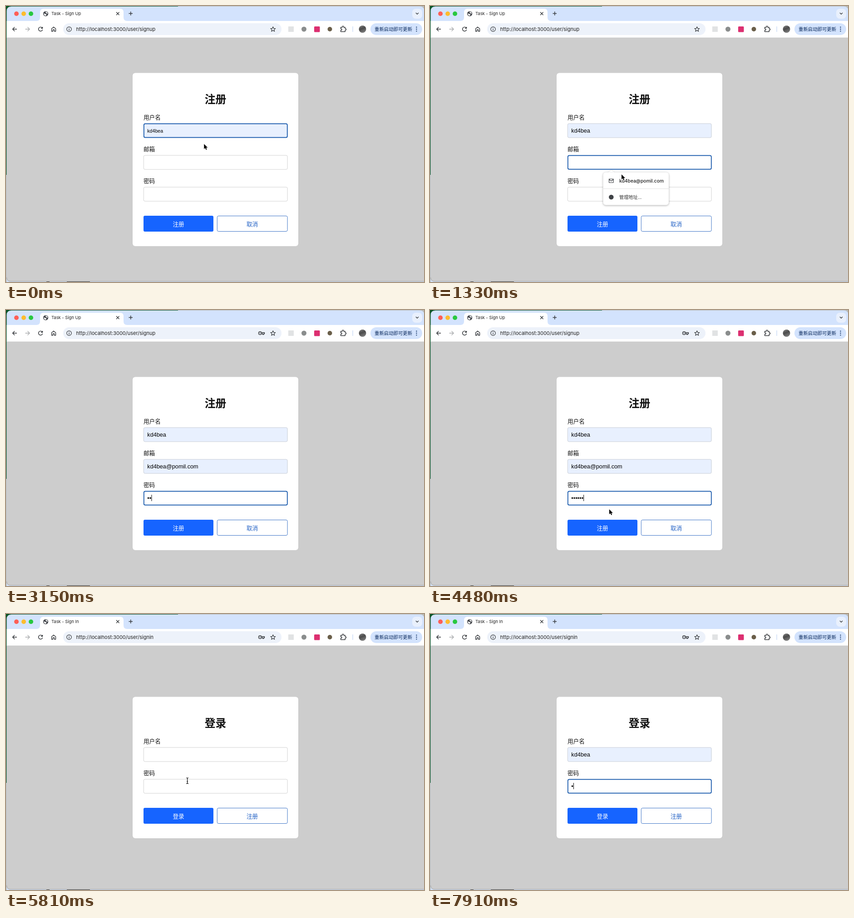
Recreate the animation shown at these times as an HTML page. Size 921 by 608 pixels, loop 8000 ms.

```html
<!DOCTYPE html>
<html lang="zh-CN">
<head>
<meta charset="utf-8">
<title>Sign up</title>
<style>
html, body { margin: 0; width: 100%; height: 100%; overflow: hidden; }
svg { display: block; width: 921px; height: 608px; }
text { font-family: Inter, "Noto Sans CJK SC", "Noto Sans CJK", sans-serif; fill: #1f1f1f; white-space: pre; }
.cjk { font-family: "Noto Sans CJK SC", "Noto Sans CJK", sans-serif; font-size: 12.6px; fill: #111; }
.value { font-family: "Liberation Sans", Arial, sans-serif; font-size: 12.7px; fill: #000; }
.mid { text-anchor: middle; }
.icon { fill: none; stroke: #34373b; stroke-width: 1.4; stroke-linejoin: round; }
.popup { filter: drop-shadow(0 1px 2px #0005); }
</style>
</head>
<body>
<svg viewBox="0 0 921 608">
  <defs>
    <linearGradient id="photo" x2="0.4" y2="1">
      <stop stop-color="#8b8b8b"/><stop offset=".5" stop-color="#4b4b4b"/><stop offset="1" stop-color="#777"/>
    </linearGradient>
    <g id="globe">
      <circle r="5.6" fill="#45484d"/>
      <path d="M-4 -1.6Q-2.6 1 -.4 .4T1 3.6L-.6 4.6Q-4.6 3.4 -4 -1.6ZM.2 -4.4Q3.8 -3.8 4.4 -.4Q2.2 .6 1.6 -1.2T-.6 -2Z" fill="#fff"/>
    </g>
  </defs>

  <!-- desktop edge and window -->
  <rect width="921" height="608" fill="#b9bbb9"/>
  <path d="M0 0H379V12H12V372H0Z" fill="#0b5426"/>
  <path d="M1.5 608V11Q1.5 1 12 1H911Q921 1 921 9V608Z" fill="#d3e3fd"/>
  <rect x="1.5" y="33" width="920" height="37" fill="#fff"/>
  <path d="M1.5 69.5H921V607H9Q1.5 606 1.5 599Z" fill="#cdcdcd"/>
  <path d="M1.5 598Q2 606.5 10 606.5H921" fill="none" stroke="#a5a5a5"/>
  <path d="M89 607.5H96M134 607.5H185" stroke="#555"/>

  <!-- tab strip -->
  <circle cx="23" cy="17" r="5" fill="#ff5f57"/>
  <circle cx="39" cy="17" r="5" fill="#febc2e"/>
  <circle cx="55" cy="17" r="5" fill="#28c840"/>
  <path d="M67 33Q75 33 75 25V14Q75 6 83 6H251Q259 6 259 14V25Q259 33 267 33Z" fill="#fff"/>
  <path class="icon" d="M243 13.5L249.500 20M249.500 13.500L243 20M270.500 16.500H279M274.750 12.250V20.750"/>
  <rect x="895" y="6" width="22" height="22" rx="8" fill="#e9f0fd"/>
  <path class="icon" d="M903 15L906 18L909 15"/>

  <!-- toolbar -->
  <path class="icon" d="M24 51H15M19 46.500L14.600 51L19 55.500"/>
  <path class="icon" style="stroke:#a9abad" d="M42.500 51H51.500M47.500 46.500L52 51L47.500 55.500"/>
  <path class="icon" d="M100.500 50L105 46.300L109.500 50V55.700H106.500V52.200H103.500V55.700H100.500Z"/>
  <rect x="126" y="38" width="481" height="26" rx="13" fill="#edf2fa"/>
  <circle class="icon" cx="139" cy="51" r="5.200" style="stroke-width:1.200"/>
  <path class="icon" d="M139 50.400V53.800M139 48V49.200"/>
  <path class="icon" style="stroke-width:1.200" d="M588.300 45.700L589.800 49.300L593.700 49.600L590.700 52.100L591.700 55.900L588.300 53.800L584.900 55.900L585.900 52.100L582.900 49.600L586.800 49.300Z"/>
  <rect x="622" y="45" width="12" height="12" fill="#e1e3e4"/>
  <circle cx="656.500" cy="51" r="5.500" fill="#8a8d8d"/>
  <rect x="679" y="45" width="12.500" height="12.500" rx="1.500" fill="#dc2f70"/>
  <circle cx="713.500" cy="51" r="5" fill="#6a5e49"/>
  <path class="icon" d="M737.500 47H741V45.600A1.500 1.500 0 0 1 744 45.600V47H747.300V50H748A1.500 1.500 0 0 1 748 53.200H747.300V56.500H737.500V53.500Q740 53.500 740 51.700T737.500 50Z"/>
  <path d="M764 45V57" stroke="#c5d7f5" stroke-width="1.300"/>
  <circle cx="785.500" cy="51" r="8" fill="url(#photo)"/>
  <rect x="803" y="38" width="114" height="26" rx="13" fill="#d3e3fd"/>
  <text class="cjk" x="812" y="54.800" style="font-size:10.400px;font-weight:500;fill:#08285c">重新启动即可更新</text>
  <path d="M904.500 46.700V46.710M904.500 51V51.010M904.500 55.300V55.310" stroke="#08285c" stroke-width="2.300" stroke-linecap="round"/>

  <g id="live"></g>
</svg>

<script>
const DURATION = 8000, STEP = 70;
const USER = 'kd4bea', EMAIL = 'kd4bea@pomil.com';
const FOCUS_EMAIL = 700, FILL_EMAIL = 1610, FOCUS_PASSWORD = 2240, SUBMIT = 4830;
const SIGN_IN = 5110, FOCUS_USER = 6090, FILL_USER = 6440, FOCUS_AGAIN = 7280;
const keyTimes = [2870, 3150, 3360, 3570, 3850, 4060], lastKey = 7770;
const caretResets = [70, FOCUS_EMAIL, FILL_EMAIL, FOCUS_PASSWORD, ...keyTimes,
  FOCUS_USER, FILL_USER, FOCUS_AGAIN, lastKey];

// Pointer stops: time, x, y
const pointerPath = [
  [210, 436.3, 304], [770, 415, 343], [840, 415, 343], [1190, 422, 371], [1540, 422, 371],
  [2170, 405, 411], [4270, 405, 411], [4760, 379.3, 482.3], [5460, 379.3, 482.3],
  [6020, 409, 314], [6090, 409, 314], [6300, 376, 349], [6580, 374, 347], [6650, 387, 362.500],
  [6860, 387, 362.500], [7070, 379, 380],
];

const live = document.getElementById('live');
const ruler = document.createElement('canvas').getContext('2d');
ruler.font = '12.7px "Liberation Sans", Arial, sans-serif';

const within = (t, from, to) => t >= from && t < to;
const text = (x, y, content, attrs = '') => `<text x="${x}" y="${y}" ${attrs}>${content}</text>`;
const box = (x, y, w, h, attrs) => `<rect x="${x}" y="${y}" width="${w}" height="${h}" ${attrs}/>`;
const icon = (d, attrs = '') => `<path class="icon" d="${d}" ${attrs}/>`;

function pointerAt(t) {
  const i = pointerPath.findIndex(stop => stop[0] > t);
  if (i === 0) return pointerPath[0].slice(1);
  if (i < 0) return pointerPath.at(-1).slice(1);
  const [t0, x0, y0] = pointerPath[i - 1], [t1, x1, y1] = pointerPath[i];
  const u = (t - t0) / (t1 - t0), k = u * u * (3 - 2 * u);
  return [x0 + (x1 - x0) * k, y0 + (y1 - y0) * k];
}

function formAt(t) {
  if (t < SIGN_IN) return {
    title: '注册', buttons: ['注册', '取消'],
    fields: [
      { label: '用户名', value: USER, auto: true, preview: t < 70, focus: t < FOCUS_EMAIL },
      { label: '邮箱', value: t < 1400 ? '' : EMAIL, auto: t >= 1400, preview: t < FILL_EMAIL,
        focus: within(t, FOCUS_EMAIL, FOCUS_PASSWORD) },
      { label: '密码', value: '•'.repeat(keyTimes.filter(k => k <= t).length),
        focus: within(t, FOCUS_PASSWORD, SUBMIT) },
    ],
  };
  return {
    title: '登录', buttons: ['登录', '注册'],
    fields: [
      { label: '用户名', value: t < 6370 ? '' : USER, auto: t >= 6370, preview: t < FILL_USER,
        focus: within(t, FOCUS_USER, 7210) },
      { label: '密码', value: t < lastKey ? '' : '•', focus: t >= 7210 },
    ],
  };
}

function drawField(field, y, t) {
  const { value, focus, auto, preview } = field;
  const fill = auto ? '#e8f0fe' : '#fff';
  let out = text(303, y - 8.8, field.label, 'class="cjk"');
  out += focus
    ? box(303.8, y + .8, 316, 30.4, `rx="3" fill="${fill}" stroke="#0e52a8" stroke-width="1.700"`)
    : box(303.3, y + .5, 316.8, 31, `rx="3" fill="${fill}" stroke="${auto ? '#c8cdd6' : '#d2d2d2'}"`);
  out += text(311.3, y + (preview ? 20 : 20.3), value,
    `class="value" ${preview ? 'style="font-size:10.600px"' : ''}`);
  const reset = caretResets.filter(r => r <= t).at(-1);
  if (focus && !(value && preview) && t !== 7210 && (t - reset) % 980 < 490)
    out += box(311.5 + ruler.measureText(value).width, y + 8.5, 1, 14, 'fill="#000"');
  return out;
}

function drawForm({ title, buttons, fields }, t) {
  const h = 171.5 + 70 * fields.length, top = 338.25 - h / 2, y = top + 104.5 + 70 * fields.length;
  return box(279, top, 365, h, 'rx="6" fill="#fff"')
    + text(461.5, top + 66, title, 'class="cjk mid" style="font-size:23.800px;font-weight:700"')
    + fields.map((field, i) => drawField(field, top + 111 + 70 * i, t)).join('')
    + box(303, y, 154, 35, 'rx="3" fill="#1664ff"')
    + box(465.3, y + .5, 154.800, 34, 'rx="3" fill="#fff" stroke="#3e74c6"')
    + text(380, y + 22.7, buttons[0], 'class="cjk mid" style="fill:#fff"')
    + text(542.5, y + 22.7, buttons[1], 'class="cjk mid" style="fill:#1f5fc4"');
}

function drawPopup(x, y, w, h, content) {
  return `<g class="popup">${box(x, y, w, h, 'rx="6" fill="#fff"')}
    <path d="M${x + 11} ${y}l7 -4.500l7 4.500z" fill="#fff"/></g>${content}`;
}

function drawPopups(t) {
  const style = 'style="font-size:10.250px;font-weight:500"';
  if (within(t, 770, FILL_EMAIL)) return drawPopup(381.5, 366.5, 144.5, 72,
    box(381.5, 402, 144.5, 1, 'fill="#e2e2e2"')
    + icon('M394.500 381H404V389H394.500ZM394.500 382L399.250 385.500L404 382', 'style="stroke-width:1.100"')
    + text(417, 388.7, EMAIL, style)
    + '<circle cx="399.300" cy="421" r="5.300" fill="#3f4246"/>'
    + text(417, 424.7, '管理地址...', 'style="font-size:10.200px;fill:#333"'));
  if (within(t, FOCUS_USER + STEP, FILL_USER)) return drawPopup(368, 331.5, 76, 36, text(385, 353.5, USER, style));
  return '';
}

function drawChrome(t) {
  const loading = within(t, 4900, SIGN_IN), page = t < 4900 ? 'signup' : 'signin';
  const url = `localhost:3000/user/${page}`;
  const title = loading ? url : `Task - Sign ${t < 4900 ? 'Up' : 'In'}`;
  const small = within(t, 4900, 5180);
  return `<use href="#globe" transform="translate(87.500 17) scale(${small ? .6 : 1})"/>`
    + (small ? icon('M89 12A5 5 0 0 1 92.500 16', 'style="stroke-width:1.100"') : '')
    + text(100, 20.2, title, 'font-size="9.400"')
    + text(154.5, 54.9, 'http://' + url, 'font-size="11"')
    + (loading ? icon('M72.500 47.500L79.500 54.500M79.500 47.500L72.500 54.500')
      : icon('M79.800 48.300A4.500 4.500 0 1 0 80.500 52M80.500 46V49.300H77.200'))
    + (within(t, 2940, FOCUS_USER) || t >= 7840
      ? '<circle class="icon" cx="559.800" cy="51" r="3.300"/><circle cx="559.800" cy="51" r="1" fill="#34373b"/>'
        + icon('M563 49.800H569.500V52.300H568V54H565.500V52.300H563')
      : '');
}

function drawPointer(t, fieldCount) {
  if (within(t, 2870, 4340) || t >= lastKey) return '';
  const [x, y] = pointerAt(t), firstField = fieldCount === 3 ? 258.5 : 293.5;
  const row = (y - firstField) / 70;
  const overField = x > 303 && x < 620 && row >= 0 && row < fieldCount && (y - firstField) % 70 < 32;
  const shape = overField
    ? '<path d="M-2.500 -6.500Q0 -6.500 0 -4.500Q0 -6.500 2.500 -6.500M0 -4.500V4.500M-2.500 6.500Q0 6.500 0 4.500Q0 6.500 2.500 6.500M-1.500 1.500H1.500" fill="none" stroke="#111" stroke-width="1.200"/>'
    : '<path d="M0 0V11L2.600 8.700L4.400 12.800L6.300 12L4.600 8.100H8Z" fill="#000" stroke="#fff" stroke-width="1.600" paint-order="stroke"/>';
  return `<g transform="translate(${x} ${y})">${shape}</g>`;
}

let drawnStep = -1;
function frame(now) {
  const t = Math.floor(now % DURATION / STEP) * STEP;
  if (t !== drawnStep) {
    drawnStep = t;
    const form = formAt(t);
    live.innerHTML = drawChrome(t) + drawForm(form, t) + drawPopups(t) + drawPointer(t, form.fields.length);
  }
  requestAnimationFrame(frame);
}
frame(performance.now());
</script>
</body>
</html>
```
